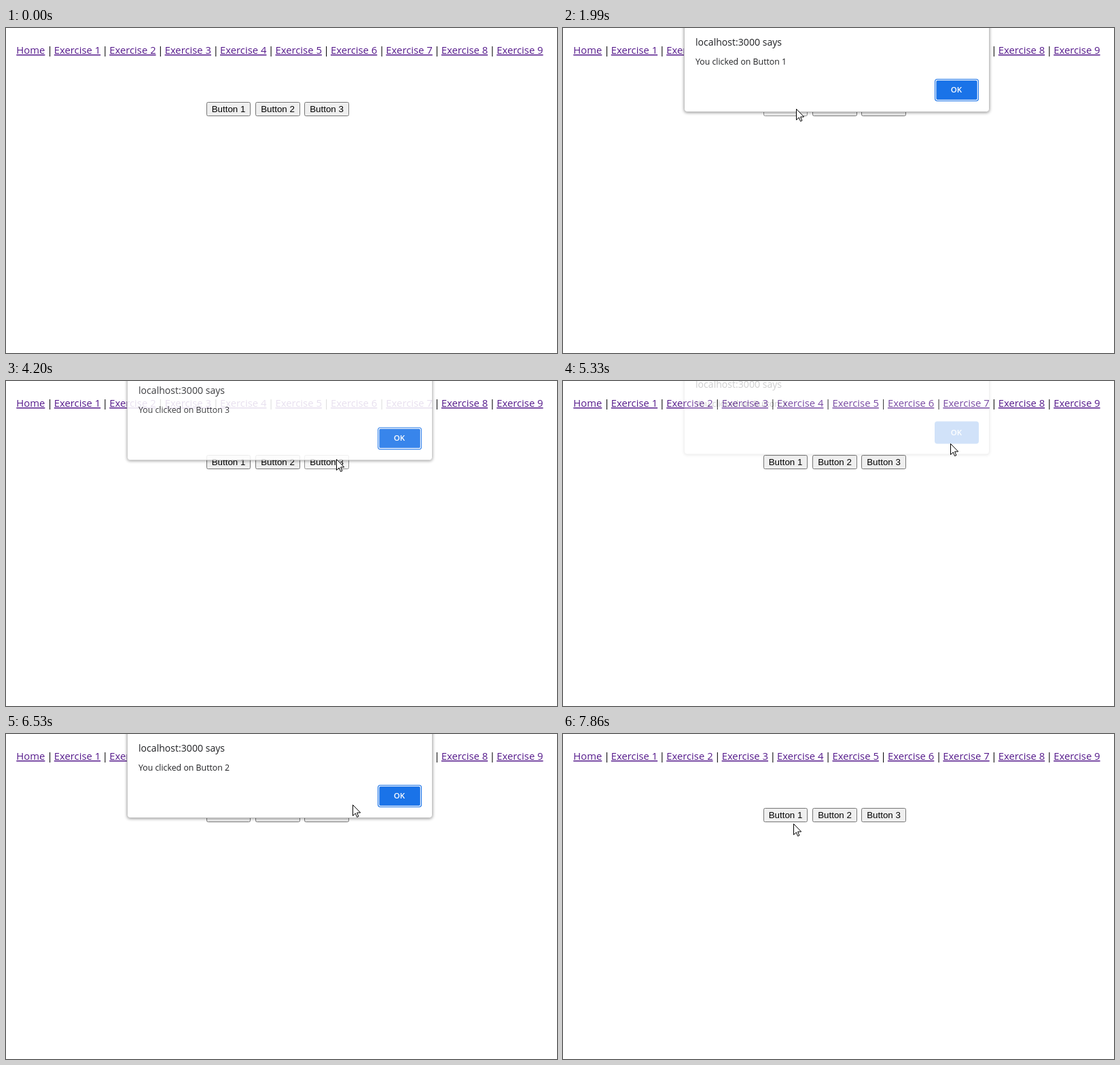
Animation of 811x479 px, one loop 8000 ms. Source, as an HTML page:

```html
<!DOCTYPE html>
<html lang="en">
<head>
<meta charset="utf-8">
<title>Button alerts</title>
<style>
  html, body { margin: 0; width: 100%; height: 100%; overflow: hidden; background: #fff; }
  svg { display: block; }
  text { font-family: "Open Sans", "Noto Sans", sans-serif; white-space: pre; }
  #nav text { font-size: 14.85px; }
  .link { fill: #551a8b; text-decoration: underline; text-decoration-thickness: 1px; text-underline-offset: 1px; }
  .bar { text-anchor: middle; }
  #buttons rect { fill: #efefef; stroke: #767676; }
  #buttons .hover rect { fill: #f5f5f5; stroke: #8f8f8f; }
  #buttons text { font: 13.333px "Liberation Sans", Arial, sans-serif; text-anchor: middle; }
  #panel { fill: #fff; stroke: #c4c4c4; filter: drop-shadow(0 1px 2px #0006); }
  #ok { fill: #1a73e8; }
  #ok.hover { fill: #2a7ce6; }
</style>
</head>
<body>
<svg width="811" height="479" viewBox="0 0 811 479">
  <g id="nav"></g>
  <g id="buttons"></g>
  <g id="dialog">
    <rect id="panel" x="178.5" y="-30" width="449" height="153.5" rx="4"/>
    <text x="195" y="25.5" font-size="14.1" fill="#202124">localhost:3000 says</text>
    <text id="message" x="195" y="54" font-size="12.34" fill="#202124"></text>
    <rect id="ok" x="547" y="75" width="65" height="33" rx="4"/>
    <rect id="ring" x="548.7" y="76.7" width="61.6" height="29.6" rx="2.5" fill="none" stroke="#fff" stroke-width="1.2"/>
    <text x="579" y="95.3" font-size="11.5" font-weight="600" fill="#fff" text-anchor="middle">OK</text>
  </g>
  <g id="pointer">
    <circle id="press" r="12" fill="#ff0" fill-opacity=".5"/>
    <path d="M-.5 .5V16.5L3.3 13 5.6 18.5 7.9 17.5 5.6 12H10.7Z" fill="#fff" stroke="#000"/>
  </g>
</svg>
<script>
const LOOP = 8000, FADE = 200, SLIDE = 20;
const $ = id => document.getElementById(id);
const clamp = v => Math.min(1, Math.max(0, v));
const easeOut = u => 1 - (1 - u) ** 2;
const easeInOut = u => u * u * (3 - 2 * u);

function add(parent, tag, attrs, text = '') {
  const el = document.createElementNS('http://www.w3.org/2000/svg', tag);
  for (const name in attrs) el.setAttribute(name, attrs[name]);
  el.textContent = text;
  parent.append(el);
  return el;
}

add($('nav'), 'text', { x: 15.3, y: 38, class: 'link' }, 'Home');
for (let i = 0; i < 9; i++) {
  const x = 70.8 + i * 81.42;
  add($('nav'), 'text', { x: x - 6.3, y: 38, class: 'bar' }, '|');
  add($('nav'), 'text', { x, y: 38, class: 'link' }, `Exercise ${i + 1}`);
}

const buttons = [[295, 65], [367, 66], [439, 66]].map(([x, w], i) => {
  const el = add($('buttons'), 'g', {});
  add(el, 'rect', { x: x + .5, y: 109.5, width: w - 1, height: 20, rx: 2 });
  add(el, 'text', { x: x + w / 2, y: 124 }, `Button ${i + 1}`);
  return { el, x, w };
});

// Pointer moves: start, end, target x, target y
const origin = [592, 416];
const moves = [
  [190, 900, 338, 120],
  [1930, 2590, 590, 89],
  [3130, 3530, 438, 126],
  [3740, 4020, 487, 115],
  [4730, 5070, 588, 88],
  [5240, 5730, 402, 128],
  [6260, 6730, 579, 89],
  [6790, 7000, 583, 87],
  [7560, 7860, 340, 132],
];
const presses = [920, 2990, 4050, 5130, 5930, 7470];
const alerts = [
  { button: 1, open: 1000, close: 3085 },
  { button: 3, open: 4118, close: 5225 },
  { button: 2, open: 6046, close: 7565 },
];

function pointerAt(t) {
  let [x, y] = origin;
  moves.forEach(([start, end, tx, ty], i) => {
    const u = clamp((t - start) / (end - start));
    const k = i ? easeInOut(u) : easeOut(u);
    x += (tx - x) * k;
    y += (ty - y) * k;
  });
  return [x, y];
}

function draw(t) {
  const [x, y] = pointerAt(t);
  const over = (left, top, w, h) => t >= 190 && x >= left && x < left + w && y >= top && y < top + h;
  $('pointer').setAttribute('transform', `translate(${Math.round(x)} ${Math.round(y)})`);
  $('pointer').style.display = t < 190 ? 'none' : '';
  $('press').style.display = presses.some(p => t >= p && t < p + 70) ? '' : 'none';
  for (const b of buttons) b.el.classList.toggle('hover', over(b.x, 109, b.w, 21));

  const alert = alerts.find(a => t >= a.open && t < a.close + FADE);
  $('dialog').style.display = alert ? '' : 'none';
  if (!alert) return;
  const closing = t >= alert.close;
  const shown = closing
    ? 1 - easeOut(clamp((t - alert.close) / FADE))
    : easeOut(clamp((t - alert.open) / FADE));
  $('dialog').setAttribute('transform', `translate(0 ${-SLIDE * (1 - shown)})`);
  $('dialog').setAttribute('opacity', clamp(1.5 * shown - .12));
  $('message').textContent = `You clicked on Button ${alert.button}`;
  $('ring').style.display = closing ? 'none' : '';
  $('ok').classList.toggle('hover', over(547, 75, 65, 33));
}

const began = performance.now();
function tick() {
  draw((performance.now() - began) % LOOP);
  requestAnimationFrame(tick);
}
tick();
</script>
</body>
</html>
```
